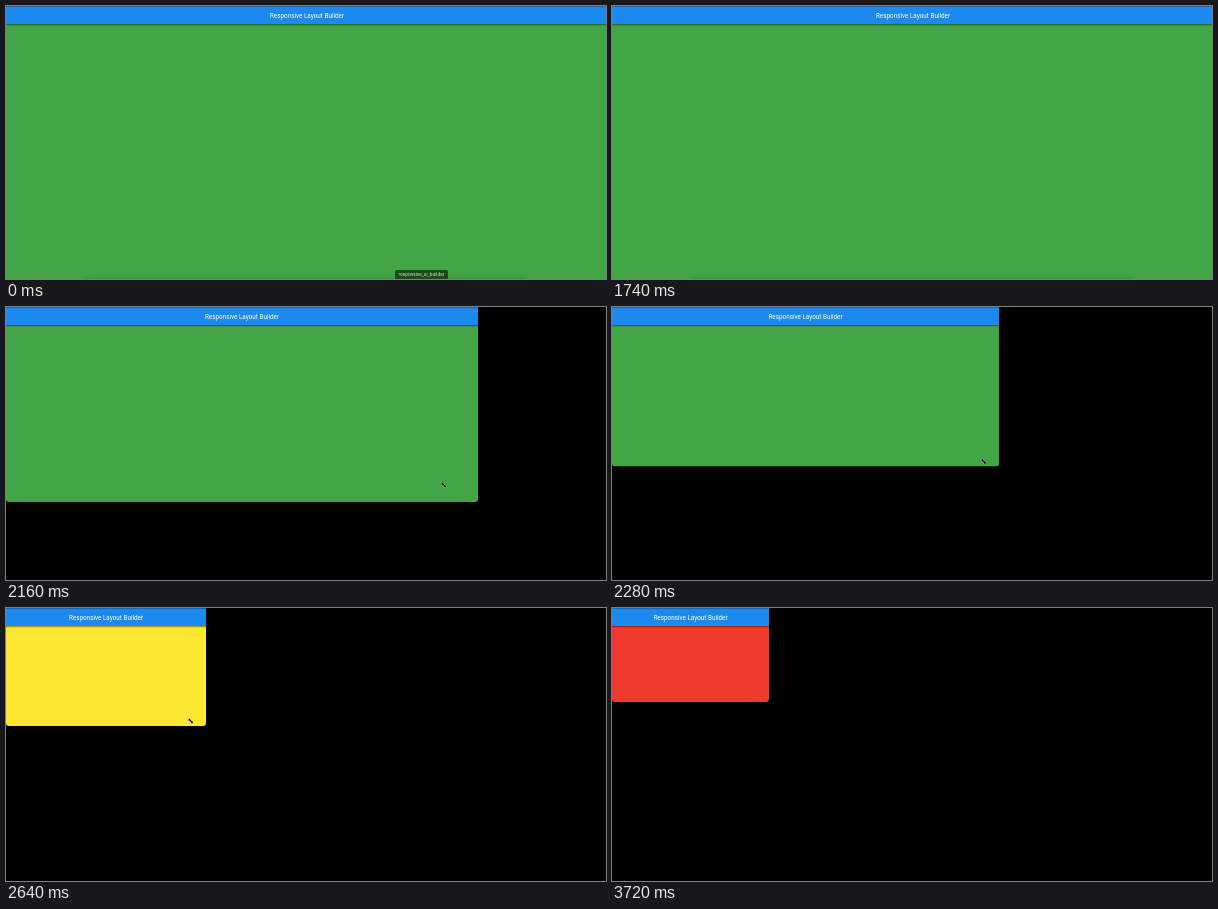
Write an HTML page with a canvas that moves like this. It is 600 by 273 pixels and loops after 4.14 s.

```html
<!DOCTYPE html>
<html lang="en">
<head>
<meta charset="utf-8">
<title>Responsive Layout Builder</title>
<style>
html, body { margin: 0; width: 100%; height: 100%; overflow: hidden; background: #000; }
canvas { display: block; }
</style>
</head>
<body>
<canvas id="stage" width="600" height="273"></canvas>
<script>
const ctx = document.getElementById('stage').getContext('2d');
const LOOP = 4140, STEP = 60, BAR = 18;
const DRAG = 1740, LEAVE = 3420, GONE = 3720;

// key points of the dragged window corner
const corners = [
  { t: DRAG, w: 602, h: 277 },
  { t: 1980, w: 562, h: 251 },
  { t: 2160, w: 472, h: 195 },
  { t: 2220, w: 412, h: 167 },
  { t: 2340, w: 362, h: 152 },
  { t: 2640, w: 200, h: 118 },
  { t: 2790, w: 157, h: 94 },
];

const mix = (a, b, p) => a + (b - a) * Math.min(1, Math.max(0, p));

function cornerAt(t) {
  const i = Math.max(1, corners.findIndex(c => c.t > t));
  const done = t >= corners.at(-1).t;
  const [a, b] = done ? corners.slice(-2) : [corners[i - 1], corners[i]];
  const p = (t - a.t) / (b.t - a.t);
  return { w: mix(a.w, b.w, p), h: mix(a.h, b.h, p) };
}

// the pointer moves at a steady speed, the window catches up with it
function pointerAt(t, { w, h }) {
  const x = Math.max(w - 34, Math.min(w - 15, 438 - (t - 2160) / 2));
  const y = h - 5 - 0.63 * (w - 15 - x);
  return t < LEAVE ? { x: x, y: y } : leavingPointer(t);
}

function leavingPointer(t) {
  const p = (t - LEAVE) / (GONE - STEP - LEAVE);
  return { x: mix(142, 559, p), y: mix(84, 2, p) };
}

function label(text, x, y, font, color) {
  ctx.font = font;
  ctx.fillStyle = color;
  ctx.textAlign = 'center';
  ctx.fillText(text, x, y);
}

function drawWindow({ w, h }) {
  ctx.save();
  ctx.beginPath();
  ctx.roundRect(0, 0, w, h, [0, 0, 3, 3]);
  ctx.clip();
  ctx.fillStyle = w > 386 ? '#42a546' : w > 193 ? '#fee733' : '#f0392d';
  ctx.fillRect(0, 0, w, h);
  const shade = ctx.createLinearGradient(0, BAR, 0, BAR + 2);
  shade.addColorStop(0, 'rgba(0,0,0,.45)');
  shade.addColorStop(1, 'rgba(0,0,0,0)');
  ctx.fillStyle = shade;
  ctx.fillRect(0, BAR, w, 2);
  ctx.fillStyle = '#1c89ee';
  ctx.fillRect(0, 0, w, BAR);
  ctx.fillStyle = 'rgba(0,0,0,.3)';
  ctx.fillRect(0, 0, w, 0.8);
  label('Responsive Layout Builder', w / 2, 11.5, '6.35px Roboto, sans-serif', '#fff');
  ctx.restore();
}

function drawBottomShadow() {
  ctx.save();
  ctx.shadowColor = 'rgba(0,0,0,.35)';
  ctx.shadowBlur = 5;
  ctx.fillRect(80, 274, 440, 4);
  ctx.restore();
}

function drawTooltip(alpha) {
  ctx.globalAlpha = alpha;
  ctx.beginPath();
  ctx.roundRect(389, 264, 53, 9, 1.5);
  ctx.fillStyle = '#1c4a1c';
  ctx.fill();
  label('responsive_ui_builder', 415.5, 270, '4.5px Inter, sans-serif', '#e4ece4');
  ctx.globalAlpha = 1;
}

function drawPointer({ x, y }, leaving) {
  const shape = new Path2D(leaving
    ? 'M-1.5-3V2.5L0 1.2 1 3.4 1.8 3 .9 1H2.6Z'
    : 'M-2.4-2.2H-.4L-.9-1.5 1.2.6 1.8-.1V2.2H-.2L.4 1.5-1.6-.6-2.4.1Z');
  ctx.save();
  ctx.translate(x, y);
  ctx.lineWidth = 0.6;
  ctx.strokeStyle = 'rgba(255,255,255,.6)';
  ctx.stroke(shape);
  ctx.fillStyle = '#000';
  ctx.fill(shape);
  ctx.restore();
}

function draw(now) {
  const t = Math.floor(now % LOOP / STEP) * STEP;
  const corner = cornerAt(t);
  ctx.clearRect(0, 0, 600, 273);
  drawWindow(corner);
  if (t <= DRAG) drawBottomShadow();
  if (t < 180) drawTooltip(t < STEP ? 1 : 0.4);
  if (t > DRAG && t < GONE) drawPointer(pointerAt(t, corner), t > LEAVE);
}

const start = performance.now();
(function frame() {
  draw(performance.now() - start);
  requestAnimationFrame(frame);
})();
</script>
</body>
</html>
```
